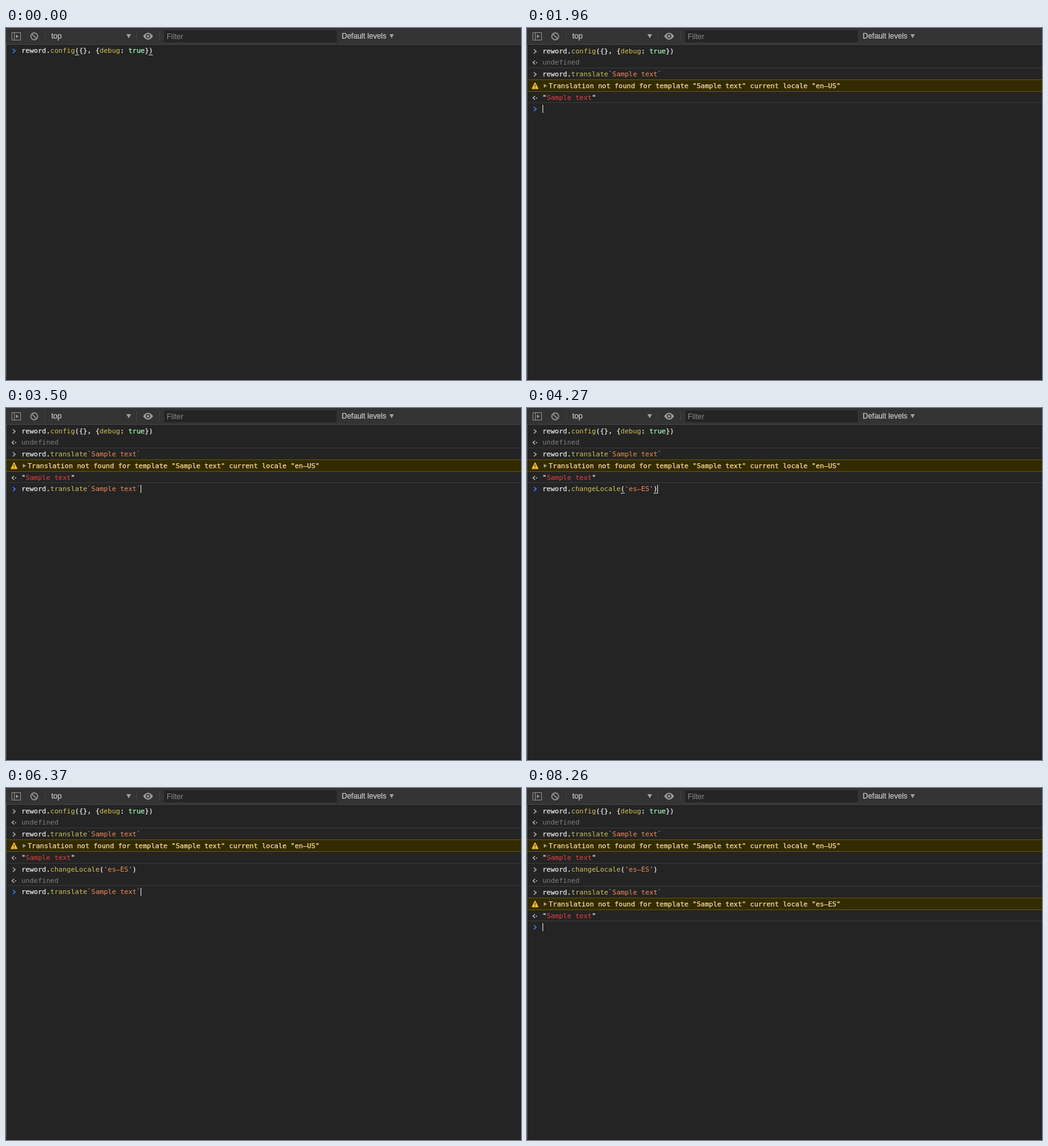
Animation of 830 by 568 pixels, one loop 8.33 s. Source, as an HTML page:

```html
<!DOCTYPE html>
<html lang="en">
<head>
<meta charset="utf-8">
<title>Console session</title>
<style>
  html, body { margin: 0; width: 100%; height: 100%; overflow: hidden; background: #242424; }
  svg { display: block; }
  text { font: 11px "DejaVu Sans Mono", monospace; white-space: pre; stroke-width: .25px; }
  .ui { font: 12px "Liberation Sans", Arial, sans-serif; }
  .plain { fill: #e8e8e8; stroke: #e8e8e8; }
  .name { fill: #d2c057; }
  .atom { fill: #a1f7b5; stroke: #a1f7b5; }
  .literal { fill: #f28b54; }
  .string { fill: #e93f3b; }
  .muted { fill: #7f7f7f; }
  .warn { fill: #ffdd9e; stroke: #ffdd9e; }
  .label { fill: #c4c4c4; stroke: #c4c4c4; }
</style>
</head>
<body>
<svg width="830" height="568" viewBox="0 0 830 568">
  <rect width="830" height="568" fill="#242424"/>
  <rect width="830" height="26" fill="#333"/>
  <rect y="26" width="830" height="1" fill="#484848"/>
  <g fill="none" stroke="#919191">
    <path d="M9.5 7.5h14v12h-14zM13.5 7.5v12"/>
    <path d="M16 10.5l4.5 3-4.5 3z" fill="#919191" stroke="none"/>
    <circle cx="45.5" cy="13.5" r="5.5" stroke-width="1.8"/>
    <path d="M41.6 9.6l7.8 7.8" stroke-width="1.8"/>
  </g>
  <path d="M63.5 5v16M210.5 5v16M247.5 5v16" stroke="#424242"/>
  <text class="ui label" x="73" y="17">top</text>
  <path d="M194 10h7.5l-3.75 6.5zM618 10h7l-3.5 6.5z" fill="#a0a0a0"/>
  <path d="M221 13.2q8-11 16 0q-8 11-16 0z" fill="#a0a0a0"/>
  <circle cx="229" cy="13.2" r="3.6" fill="#333"/>
  <circle cx="229" cy="13.2" r="2" fill="#a0a0a0"/>
  <rect x="255" y="4" width="278" height="19" fill="#242424"/>
  <text class="ui" x="259" y="18" fill="#8a8a8a">Filter</text>
  <text class="ui label" x="541" y="17">Default levels</text>
  <g id="log"></g>
  <rect y="27" width="1" height="541" fill="#505050"/>
  <rect y="567" width="830" height="1" fill="#1b1b1b"/>
  <rect id="caret" width="1" height="13" fill="#f0f0f0"/>
</svg>
<script>
const LOOP = 8330, BLINK = 500, LEFT = 25, CHAR = 6.6225;
const log = document.getElementById('log');
const caret = document.getElementById('caret');

// Code is a list of [class, text] pieces.
const config = [['plain', 'reword.'], ['name', 'config'], ['plain', '({}, {'],
  ['name', 'debug'], ['plain', ': '], ['atom', 'true'], ['plain', '})']];
const translate = [['plain', 'reword.'], ['name', 'translate'], ['literal', '`Sample text`']];
const changeLocale = [['plain', 'reword.'], ['name', 'changeLocale'], ['plain', '('],
  ['literal', "'es–ES'"], ['plain', ')']];
const nothing = [['muted', 'undefined']];
const sample = [['plain', '"'], ['string', 'Sample text'], ['plain', '"']];
const missing = locale =>
  [['warn', `Translation not found for template "Sample text" current locale "${locale}"`]];

const rows = [
  ['command', config], ['result', nothing],
  ['command', translate], ['warning', missing('en–US')], ['result', sample],
  ['command', changeLocale], ['result', nothing],
  ['command', translate], ['warning', missing('es–ES')], ['result', sample]
];

// start time, logged rows, prompt content, caret phase start
const scenes = [
  [0, 0, config, -500],
  [350, 2, [], 350],
  [1400, 2, translate, 1400],
  [1960, 5, [], 1960],
  [3430, 5, translate, 3430],
  [3920, 5, changeLocale, 3920],
  [4970, 6, [], 4970],
  [5110, 7, [], 4970],
  [5600, 7, changeLocale, 5600],
  [5950, 7, translate, 5950],
  [6790, 10, [], 6790]
];

const rect = (x, y, w, h, fill) =>
  `<rect x="${x}" y="${y}" width="${w}" height="${h}" fill="${fill}"/>`;
const divider = y => rect(1, y, 829, 1, '#3a3a3a');
const code = (pieces, x, y) => `<text x="${x}" y="${y + 4}">` +
  pieces.map(([type, text]) => `<tspan class="${type}">${text}</tspan>`).join('') + '</text>';
const chevron = (y, color) =>
  `<path d="M11 ${y - 2.5}l3.8 3.3-3.8 3.3" fill="none" stroke="${color}" stroke-width="1.6"/>`;
const plainText = pieces => pieces.map(piece => piece[1]).join('');

const draw = {
  command: (y, pieces) => (y > 40 ? divider(y - 10) : '') + chevron(y, '#a5a5a5') + code(pieces, LEFT, y),
  result: (y, pieces) =>
    `<path d="M13 ${y - 2.3}l-3.3 3 3.3 3" fill="none" stroke="#bbb" stroke-width="1.4"/>` +
    rect(14.5, y, 1.8, 1.8, '#bbb') + code(pieces, LEFT, y),
  warning: (y, pieces) =>
    rect(1, y - 10, 829, 20, '#650') + rect(1, y - 9, 829, 18, '#332b00') +
    `<path d="M13 ${y - 5}l5 10h-10z" fill="#f5bd2c" stroke="#f5bd2c" stroke-linejoin="round"/>` +
    rect(12.4, y - 2, 1.2, 4, '#4a3800') + rect(12.4, y + 3, 1.2, 1.2, '#4a3800') +
    `<path d="M27 ${y - 3}l5.5 3.3-5.5 3.3z" fill="#9b9585"/>` + code(pieces, 35, y)
};

function bracketMarks(pieces, y) {
  const text = plainText(pieces);
  if (!text.endsWith(')')) return '';
  return [text.indexOf('('), text.length - 1]
    .map(column => rect(Math.round(LEFT + column * CHAR), y + 7, 6.6, 1, '#d8d8d8')).join('');
}

function show([, count, input]) {
  let y = 18, previous = '', markup = '';
  for (const [kind, pieces] of rows.slice(0, count)) {
    y += kind === 'result' && previous === 'command' ? 18 : 19;
    markup += draw[kind](y, pieces);
    previous = kind;
  }
  y += 18;
  if (count) markup += divider(y - 10);
  log.innerHTML = markup + chevron(y, '#367cf1') + code(input, LEFT, y) + bracketMarks(input, y);
  caret.setAttribute('x', Math.round(LEFT + plainText(input).length * CHAR));
  caret.setAttribute('y', y - 6);
}

let current;
function frame() {
  const time = performance.now() % LOOP;
  const scene = scenes.findLast(([start]) => start <= time);
  if (scene !== current) show(current = scene);
  const lit = Math.floor((time - scene[3]) / BLINK) % 2 === 0;
  caret.setAttribute('visibility', lit ? 'visible' : 'hidden');
  requestAnimationFrame(frame);
}
frame();
</script>
</body>
</html>
```
